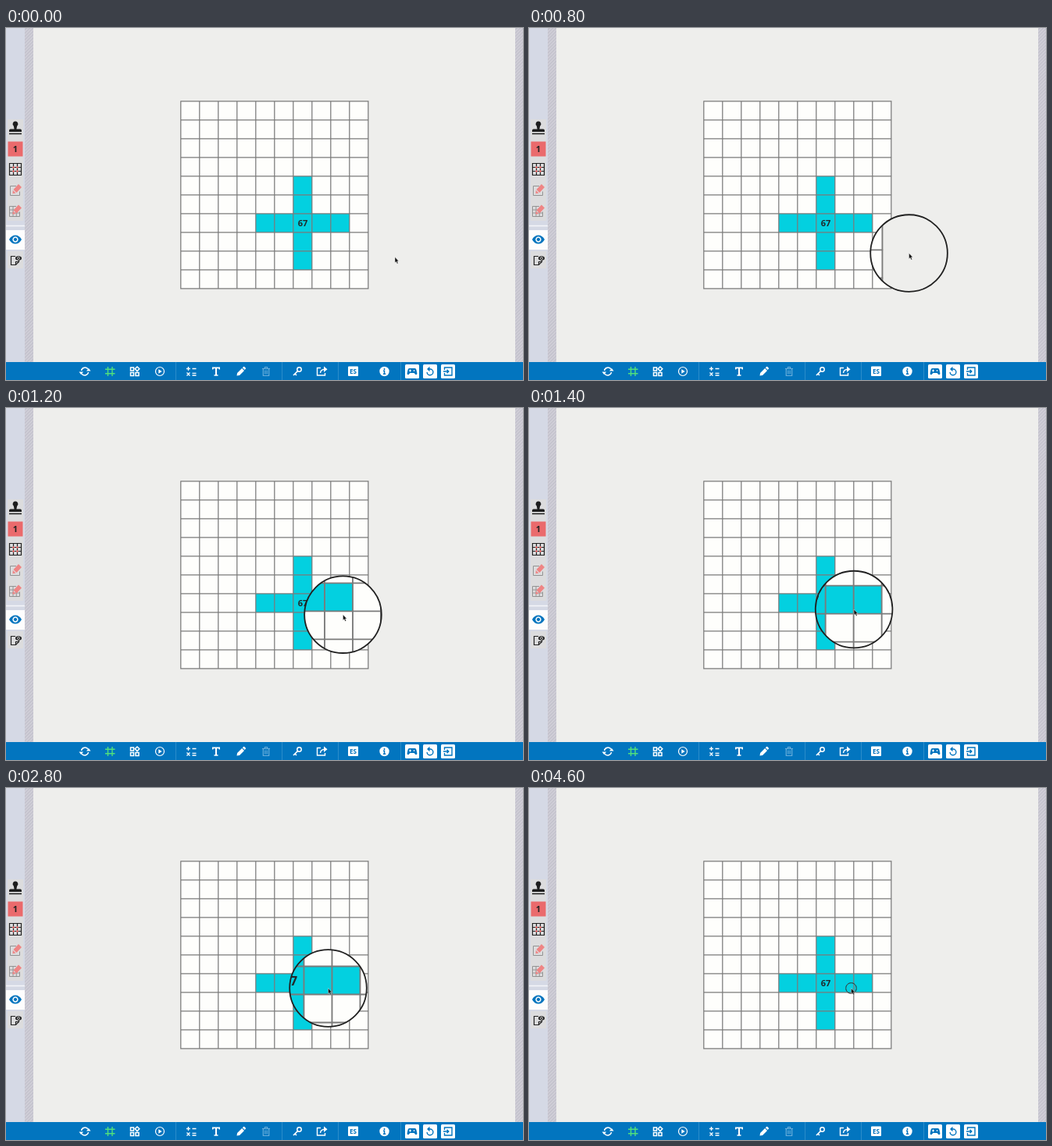
An HTML page that plays this animation: 662x451 px, repeating every 4.7 s.

```html
<!DOCTYPE html>
<html lang="en">
<head>
<meta charset="utf-8">
<title>Hundred board with magnifier</title>
<style>
html, body { margin: 0; width: 100%; height: 100%; overflow: hidden; background: #eeeeec; }
svg { display: block; }
text { text-anchor: middle; font-family: "Open Sans", "Noto Sans", sans-serif; font-weight: 700; }
.line { fill: none; stroke: #fff; stroke-width: 1.5; }
.dark { fill: none; stroke: #222; stroke-width: 1.2; }
</style>
</head>
<body>
<svg width="662" height="451" viewBox="0 0 662 451">
  <defs>
    <pattern id="hatch" width="3" height="3" patternUnits="userSpaceOnUse" patternTransform="rotate(45)">
      <rect width="3" height="3" fill="#d3d1da"/><rect width="1.4" height="3" fill="#c0bfca"/>
    </pattern>
    <clipPath id="clip"><circle id="hole"/></clipPath>
  </defs>

  <g id="scene">
    <rect width="662" height="451" fill="#eeeeec"/>
    <rect x="224" y="94" width="240" height="240" fill="#fefefc"/>
    <path d="M368 190h24v120h-24zM320 238h120v24h-120z" fill="#03d0e0"/>
    <path id="grid" fill="none" stroke="#7b7b7b" stroke-width="1.25"/>
    <g font-size="11" fill="#202a2c">
      <text x="380" y="254">67</text>
      <text id="next" x="404" y="254">68</text>
    </g>
  </g>

  <!-- side panel -->
  <rect width="24" height="428" fill="#d5d9e5"/>
  <path d="M24 0h11v428h-11zM652 0h10v428h-10z" fill="url(#hatch)"/>
  <path d="M2 117h20v130h-20zM2 286h20v22h-20z" fill="#dcdcdd"/>
  <path d="M12 119.5a3.4 3.4 0 0 1 2.2 6l-.8 4h4.8q1.800 0 1.800 2v1.500h-16v-1.500q0-2 1.800-2h4.800l-.8-4a3.400 3.400 0 0 1 2.200-6zM4 134.700h16v1.600h-16z" fill="#1d1d1d"/>
  <rect x="2.500" y="145.500" width="19" height="19" fill="#ea6a6c"/>
  <text x="12" y="159" font-size="11" fill="#222">1</text>
  <path class="dark" d="M4.500 173.500h15v15h-15z"/>
  <path d="M4.500 178.500h15M4.500 183.500h15M9.500 173.500v15M14.500 173.500v15" class="dark"/>
  <path d="M9.500 177v3M8 178.500h3M14.500 182v3M13 183.500h3M14.500 177v3M13 178.500h3M9.500 182v3M8 183.500h3" stroke="#d75454"/>
  <g fill="none" stroke="#929292">
    <path d="M13 202.500h-7.500v12h12v-5"/>
    <path d="M13 228.500h-8.500v13h13v-6M4.500 233h8M4.500 237h13M9 228.500v13M13.300 234v7.500"/>
  </g>
  <path id="eraser" d="M9.500 207l6.500-7 4 4-6.500 7zM8.800 208l3.700 3.500-4 .7z" fill="#ee8585"/>
  <use href="#eraser" y="26.500"/>
  <path d="M0 253.500h24" stroke="#f4f5f8" stroke-width="1.500"/>
  <rect y="259" width="24" height="25" fill="#fdfdfd"/>
  <path id="eye" fill-rule="evenodd" d="M4 271q3-5.500 8-5.500t8 5.500q-3 5.500-8 5.500t-8-5.500zM12 267.300a3.700 3.700 0 1 0 .01 0zM12 268.800a2.200 2.200 0 1 1-.01 0z" fill="#0275bf"/>
  <path d="M12 292.500h-5.500v11h6l4-4v-2M12.500 303.500v-4h4" class="dark" stroke-width="1"/>
  <ellipse cx="16" cy="295" rx="4" ry="2.800" fill="#222"/>
  <circle cx="16" cy="295" r="1.500" fill="#222" stroke="#ddd" stroke-width=".8"/>

  <!-- toolbar -->
  <rect y="428" width="662" height="23" fill="#0275bf"/>
  <path d="M217.500 428v23M353.500 428v23M425.500 428v23M505.500 428v23" stroke="#2b8cca"/>
  <path class="line" stroke-width="1.800" d="M96.500 439a4.700 4.700 0 0 1 8.300-2.200M105.500 441a4.700 4.700 0 0 1-8.300 2.200"/>
  <path d="M103 439.500h5.500l-2.700-3.800zM93.500 440.500h5.500l-2.800 3.800z" fill="#fff"/>
  <path d="M130.500 434v12M136 434v12M127 437.300h12.500M127 442.700h12.500" stroke="#52e07c" stroke-width="1.400"/>
  <path class="line" stroke-width="1.300" d="M159.500 435h4v4h-4zM159.500 441.500h4v4h-4zM166 441.500h4v4h-4zM168 434l2.800 2.800-2.800 2.800-2.800-2.800z"/>
  <circle class="line" cx="197" cy="440" r="5.500" style="stroke-width:1.200"/>
  <path d="M195.300 437.200v5.600l4.400-2.800z" fill="#fff"/>
  <path class="line" d="M231 436.500h5M233.500 434v5M238.500 436.500h5M231.500 441.500l4 4M235.500 441.500l-4 4M238.500 442.300h5M238.500 445h5" style="stroke-width:1.300"/>
  <path d="M264 434.500h10v3h-1.200l-.6-1.200h-2.200v8h1.500v1.400h-5v-1.400h1.500v-8h-2.200l-.6 1.200h-1.200z" fill="#fff"/>
  <path d="M295.500 445.500l.6-3.500 6-6 2.900 2.900-6 6zM302.800 435.300l1.300-1.200q.7-.5 1.400.1l1.300 1.300q.6.700 0 1.300l-1.200 1.300z" fill="#fff"/>
  <path class="line" d="M328 436.500h10M331.500 436v-1.500h3v1.500M329.300 437v8.500h7.400v-8.500M331.800 438.500v5M334.200 438.500v5" style="stroke:#69aedb;stroke-width:1.200"/>
  <circle class="line" cx="375.500" cy="437.500" r="2.700"/>
  <path class="line" d="M373.500 439.500l-5.500 5.500M370 443l2 2" style="stroke-width:1.700"/>
  <path class="line" d="M403 435.500h-4.500v9.500h10v-3M402.500 442q.5-4.500 6-4.700" style="stroke-width:1.400"/>
  <path d="M407 433.500l4.500 3.800-4.500 3.800z" fill="#fff"/>
  <rect x="438" y="433.500" width="13" height="12.500" rx="1" fill="#fff"/>
  <text x="444.500" y="443" font-size="8" fill="#0275bf">ES</text>
  <circle cx="484.500" cy="440" r="6.200" fill="#fff"/>
  <path d="M484.500 436v1.900M483 439.300h1.500v3.800M482.900 443.200h3.300" fill="none" stroke="#0275bf" stroke-width="1.500"/>
  <path id="tile" d="M512.500 431h15q1.500 0 1.500 1.500v15q0 1.500-1.500 1.500h-15q-1.500 0-1.500-1.500v-15q0-1.500 1.500-1.500z" fill="#fff"/>
  <use href="#tile" x="23"/><use href="#tile" x="46"/>
  <path d="M516.500 436h7q1.500 0 2 2l.9 4.500q.1 2-1.700 1.700l-2.200-2.200h-5l-2.200 2.200q-1.800.3-1.700-1.700l.9-4.500q.5-2 2-2z" fill="#0275bf"/>
  <path d="M516 439h3M517.500 437.500v3M522.500 438v2" stroke="#fff"/>
  <g fill="none" stroke="#0275bf" stroke-width="1.400">
    <path d="M541.500 437h1.500a3.900 3.900 0 1 1-3.900 4"/>
    <path d="M561.500 438v-3h9.500v10h-9.500v-3M560 440h6.500M564.500 437.700l2.300 2.300-2.300 2.300"/>
  </g>
  <path d="M542.500 433.800v6.400l-3.500-3.200z" fill="#0275bf"/>

  <g id="lens">
    <g clip-path="url(#clip)"><use id="zoom" href="#scene"/></g>
    <circle id="ring" fill="none" stroke="#202020"/>
  </g>
  <path id="cursor" d="M0 0v7.200l1.600-1.400 1.200 2.700 1.300-.6-1.200-2.600h2z" fill="#111" stroke="#fff" stroke-width=".4"/>
</svg>
<script>
const LOOP = 4700, STEP = 100, RADIUS = 49.3;
const el = id => document.getElementById(id);
const set = (id, attrs) => {
  for (const name in attrs) el(id).setAttribute(name, attrs[name]);
};
const clamp = v => Math.min(1, Math.max(0, v));
const swing = v => (1 - Math.cos(Math.PI * clamp(v))) / 2;

let lines = "";
for (let i = 0; i <= 10; i++) {
  const d = 24 * i;
  lines += `M${223.8 + d} 93.5v241M223.500 ${93.8 + d}h241`;
}
set("grid", { d: lines });

// The glide slows down more gently than it starts.
function glide(t) {
  const u = clamp((t - 600) / 1000);
  return swing(u + u * (1 - u) * (0.18 + 0.31 * u));
}

function draw(t) {
  const move = glide(t);
  const x = 498 - 85.5 * move, y = 293.5 - 37 * move;
  const size = t < 4100 ? swing(t / 600) : 1 - swing((t - 4095) / 667);
  const scale = 1 + size / 2, r = RADIUS * size;

  set("next", { visibility: t >= 1800 && t < 2800 ? "visible" : "hidden" });
  set("lens", { visibility: size > 0 ? "visible" : "hidden" });
  set("hole", { cx: x, cy: y, r });
  set("ring", { cx: x, cy: y, r, "stroke-width": 0.8 + size });
  set("zoom", { transform: `translate(${x} ${y}) scale(${scale}) translate(${-x} ${-y})` });
  set("cursor", { transform: `translate(${x} ${y})` });
}

const start = performance.now();
function tick() {
  const t = (performance.now() - start) % LOOP;
  draw(Math.floor(t / STEP) * STEP);
  requestAnimationFrame(tick);
}
tick();
</script>
</body>
</html>
```
